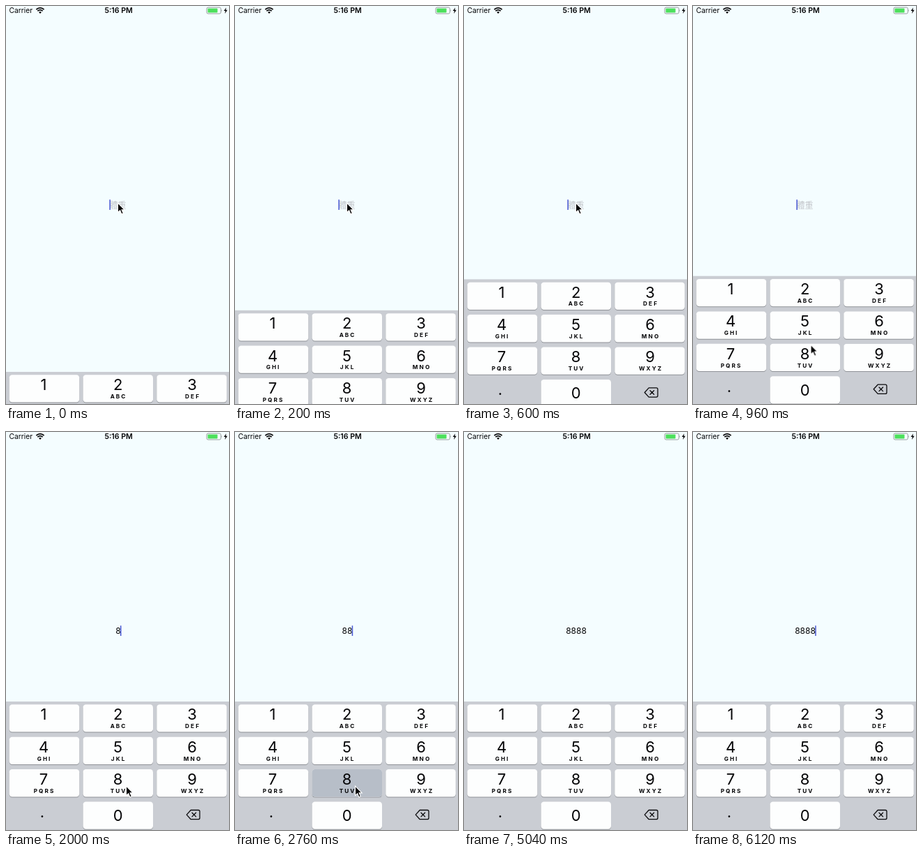
An HTML page for the animation above (6.76 s loop, 320 by 570 pixels).

```html
<!DOCTYPE html>
<html lang="en">
<head>
<meta charset="utf-8">
<title>Number pad entry</title>
<style>
  html, body { margin: 0; width: 100%; height: 100%; overflow: hidden; background: #f4fdff; }
  svg { display: block; width: 320px; height: 570px; }
  text { font-family: Inter, Roboto, sans-serif; fill: #050507; }
  .mid { text-anchor: middle; }
  .status { font-size: 10.3px; }
  .time { font-size: 10.6px; font-weight: 600; }
  .digit { font-size: 22px; }
  .letters { font-size: 8.2px; font-weight: 700; letter-spacing: 2.1px; }
  .value { font-size: 12px; }
  .hint { font: 12px "Noto Sans CJK TC", "Noto Sans CJK JP", "Noto Sans CJK", sans-serif; fill: #c3c6cb; }
  .line { fill: none; stroke: #0a0a0c; stroke-width: 1.3; stroke-linecap: round; stroke-linejoin: round; }

  #cursor, #caret, .pressed { animation: 6760ms linear infinite; }
  #cursor { animation-name: move; }
  #caret { animation-name: blink; fill: #4656d2; }
  .pressed { animation-name: press; fill: #b7bec8; }

  @keyframes move {
    0%, 10.06% { transform: translate(160px, 281px); animation-timing-function: cubic-bezier(.5, 0, .75, .75); }
    14.2% { transform: translate(168.5px, 484px); animation-timing-function: ease-out; }
    17.75%, 20.71% { transform: translate(172px, 511px); animation-timing-function: ease-in-out; }
    23.08%, 65.09% { transform: translate(172px, 506px); visibility: visible; animation-timing-function: ease-in; }
    70.41% { transform: translate(7px, 430px); visibility: visible; }
    70.9%, 99.99% { transform: translate(-20px, 425px); visibility: hidden; }
    100% { transform: translate(160px, 281px); visibility: visible; }
  }
  @keyframes blink {
    0%, 71% { opacity: 1; }
    74.56%, 85.8% { opacity: 0; }
    90.53%, 100% { opacity: 1; }
  }
  @keyframes press {
    0%, 23.66% { opacity: 0; }
    23.67%, 27.22% { opacity: 1; }
    28.4%, 30.76% { opacity: 0; }
    30.77%, 34.32% { opacity: 1; }
    35.5%, 39.04% { opacity: 0; }
    39.05%, 42.6% { opacity: 1; }
    43.79%, 46.74% { opacity: 0; }
    46.75%, 49.7% { opacity: 1; }
    50.89%, 100% { opacity: 0; }
  }
</style>
</head>
<body>
<svg viewBox="0 0 320 570">
  <rect width="320" height="570" fill="#f4fdff"/>

  <text class="status" x="4.5" y="10.2">Carrier</text>
  <g fill="none" stroke="#050507" stroke-width="1.7">
    <path d="M43.4 5Q49 .2 54.6 5M45.3 7.2Q49 4 52.7 7.2"/>
    <path d="M49 11l-2-2.2q2-1.6 4 0z" fill="#050507" stroke="none"/>
  </g>
  <text class="time mid" x="161.7" y="10.3">5:16 PM</text>
  <rect x="288" y="2" width="20.3" height="9" rx="2" fill="none" stroke="#8d9394" stroke-width=".9"/>
  <rect x="289.5" y="3.5" width="14" height="6" rx=".8" fill="#4ce05c"/>
  <path d="M309.4 5q1.4 1.5 0 3z" fill="#8d9394"/>
  <path d="M316 2.2l-3.4 4.9h2.2l-.7 3.9 3.6-5.2h-2.3z" fill="#050507"/>

  <text id="hint" class="hint mid" x="160.4" y="289.5">體重</text>
  <text id="value" class="value mid" x="161" y="289.3"></text>
  <rect id="caret" y="277.3" width="1.5" height="14.7"/>

  <g id="pad">
    <rect width="320" height="200" fill="#cacdd3"/>
    <text class="digit mid" x="51.8" y="166">.</text>
    <path class="line" d="M265.2 155.5H276a2 2 0 0 1 2 2V166.7a2 2 0 0 1-2 2H265.2L259.2 162.1ZM267 159.3l5.6 5.6m0-5.6l-5.6 5.6"/>
  </g>

  <g id="cursor">
    <path d="M.5 1V14.6L3.7 11.7 5.9 16.9 8.2 15.9 6.1 10.9H10.2Z" stroke="#fff" stroke-width="1.1"/>
  </g>
</svg>
<script>
  const $ = id => document.getElementById(id);
  const LOOP = 6760, PAD_TOP = 386, DIGIT_W = 7.5;
  const typedAt = [1840, 2320, 2880, 3360];
  const letters = ['', 'ABC', 'DEF', 'GHI', 'JKL', 'MNO', 'PQRS', 'TUV', 'WXYZ'];
  const pad = $('pad'), caret = $('caret');

  function add(tag, attrs, text = '') {
    const el = document.createElementNS('http://www.w3.org/2000/svg', tag);
    for (const name in attrs) el.setAttribute(name, attrs[name]);
    el.textContent = text;
    pad.append(el);
  }

  function addKey(digit, col, row, label) {
    const x = 4.7 + col * 105.8, y = 4.3 + row * 46.4, mid = 54.1 + col * 106.5;
    const box = { x, y, width: 100.5, height: 39.3, rx: 4.2 };
    add('rect', { ...box, y: y + 1, fill: '#8f9297' });
    add('rect', { ...box, fill: '#fdfefe' });
    if (digit === 8) add('rect', { ...box, class: 'pressed' });
    add('text', { x: mid, y: y + (row === 3 ? 27.4 : 22), class: 'digit mid' }, digit);
    if (label) add('text', { x: mid + 1, y: y + 33.8, class: 'letters mid' }, label);
  }

  letters.forEach((label, i) => addKey(i + 1, i % 3, Math.floor(i / 3), label));
  addKey(0, 1, 3);

  const clock = $('cursor').getAnimations()[0];

  function render() {
    const t = (clock.currentTime || 0) % LOOP;
    pad.setAttribute('transform', `translate(0 ${PAD_TOP + 138 * Math.exp(-t / 180)})`);
    const count = typedAt.filter(at => t >= at).length;
    $('value').textContent = '8'.repeat(count);
    $('hint').style.visibility = count ? 'hidden' : 'visible';
    caret.setAttribute('x', count ? 160.2 + count * DIGIT_W / 2 : 148.4);
    requestAnimationFrame(render);
  }
  render();
</script>
</body>
</html>
```
